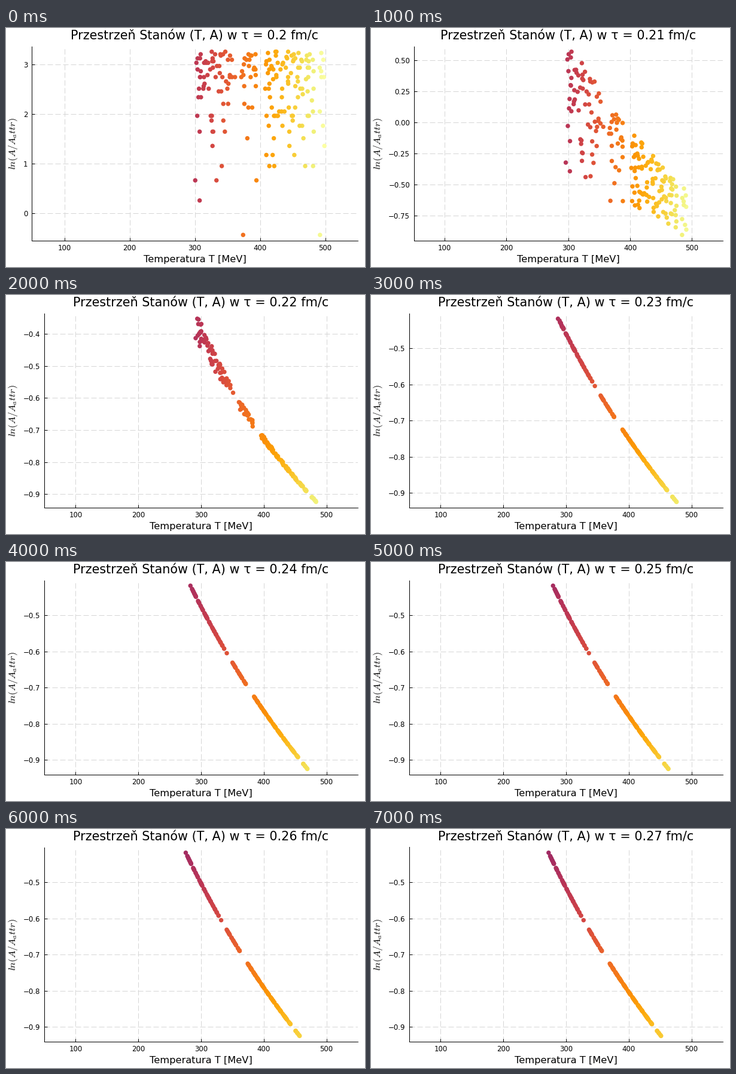
A matplotlib script that plays this animation: 600 by 400 pixels, repeating every 8 s.

```python
import numpy as np
import matplotlib.pyplot as plt
from matplotlib.animation import FuncAnimation
from matplotlib.ticker import FuncFormatter, MultipleLocator

W, H, DPI = 600, 400, 100
STEPS = 8
COUNT = 196
RIGHT, TOP, BOTTOM = 588, 30.5, 355.5
UNIT = 0.65         # spacing of the starting amplitudes
RATE = 0.0099       # decay per step and per MeV
ATTRACTOR = 188.9   # late curve: y = ln(ATTRACTOR / T)

# Points (temperature, level) that set the outer bounds, and the empty bands
ANCHORS = [(300.7, 3), (304.5, 35), (309, 38), (326, 40),
           (361.7, 24), (492, 1), (498, 24), (498.8, 6)]
GAPS = [(358.5, 369.5), (399, 404.5), (484.5, 491)]

plt.rcParams["font.family"] = "DejaVu Sans"
plt.rcParams["mathtext.fontset"] = "cm"


def start_points():
    """Random temperatures on discrete amplitude levels 1 to 40."""
    rng = np.random.default_rng(7)
    points = list(ANCHORS)
    while len(points) < COUNT:
        t = rng.uniform(301.5, 498)
        level = np.ceil(40 * rng.random() ** 0.8)
        in_gap = any(a < t < b for a, b in GAPS)
        if not in_gap and level <= 35 + (t - 305) / 4:
            points.append((t, level))
    return np.array(points, dtype=float).T


T0, LEVEL = start_points()


def temperature(n):
    """Cooling as tau^(-1/3), slightly slowed by a large amplitude."""
    slowed = T0 + 0.03 * LEVEL if n else T0
    return slowed * (0.2 / (0.2 + 0.01 * n)) ** (1 / 3)


def log_amplitude(n):
    """Exponential decay onto the attractor."""
    base = ATTRACTOR / temperature(3)
    return np.log(base + (UNIT * LEVEL - base) * np.exp(-RATE * T0 * n))


def y_scale(n):
    """Left edge, tick step and decimals."""
    if n == 0:
        return 43, 1, 0
    if n == 1:
        return 71.5, 0.25, 2
    return 64, 0.1, 1


def number(digits):
    return FuncFormatter(
        lambda v, _: f"{v + 0.0:.{digits}f}".replace("-", "\u2212"))


def pt(px):
    return px * 72 / DPI


fig = plt.figure(figsize=(W / DPI, H / DPI), dpi=DPI, facecolor="white")
ax = fig.add_axes([0.1, 0.1, 0.8, 0.8])
ax.set_xlim(50, 550)
ax.xaxis.set_major_locator(MultipleLocator(100))
ax.set_axisbelow(True)
ax.grid(color="#d6d6d6", lw=pt(1), dashes=(9, 4))
ax.tick_params(direction="in", length=pt(5), width=pt(1), pad=pt(6.4),
               labelsize=pt(11.8))
for side in ("top", "right"):
    ax.spines[side].set_visible(False)
for side in ("left", "bottom"):
    ax.spines[side].set_linewidth(pt(1))

dots = ax.scatter(T0, LEVEL, c=T0, cmap="inferno", vmin=100, vmax=500,
                  s=pt(7.4) ** 2, linewidths=0, clip_on=False, zorder=3)
title = fig.text(0.5, 1 - 18.5 / H, "", fontsize=pt(20.8), ha="center")
xlabel = fig.text(0.5, 1 - 392 / H, "Temperatura T [MeV]",
                  fontsize=pt(16.2), ha="center")
fig.text(12.4 / W, 1 - 194 / H, r"$ln(A/A_attr)$", fontsize=pt(16.4),
         rotation=90, ha="center", va="center")


def draw(n):
    left, step, digits = y_scale(n)
    ax.set_position([left / W, 1 - BOTTOM / H,
                     (RIGHT - left) / W, (BOTTOM - TOP) / H])
    temp, y = temperature(n), log_amplitude(n)
    pad = 0.03 * np.ptp(y)
    ax.set_ylim(y.min() - pad, y.max() + pad)
    ax.yaxis.set_major_locator(MultipleLocator(step))
    ax.yaxis.set_major_formatter(number(digits))
    dots.set_offsets(np.column_stack([temp, y]))
    dots.set_array(temp)

    center = (left + RIGHT) / 2 / W
    title.set_x(center)
    xlabel.set_x(center)
    tau = round(0.2 + 0.01 * n, 2)
    title.set_text(f"Przestrzeň Stanów (T, A) w τ = {tau} fm/c")
    return dots, title, xlabel


anim = FuncAnimation(fig, draw, frames=STEPS, interval=1000, repeat=True,
                     repeat_delay=0, blit=False)
plt.show()
```
